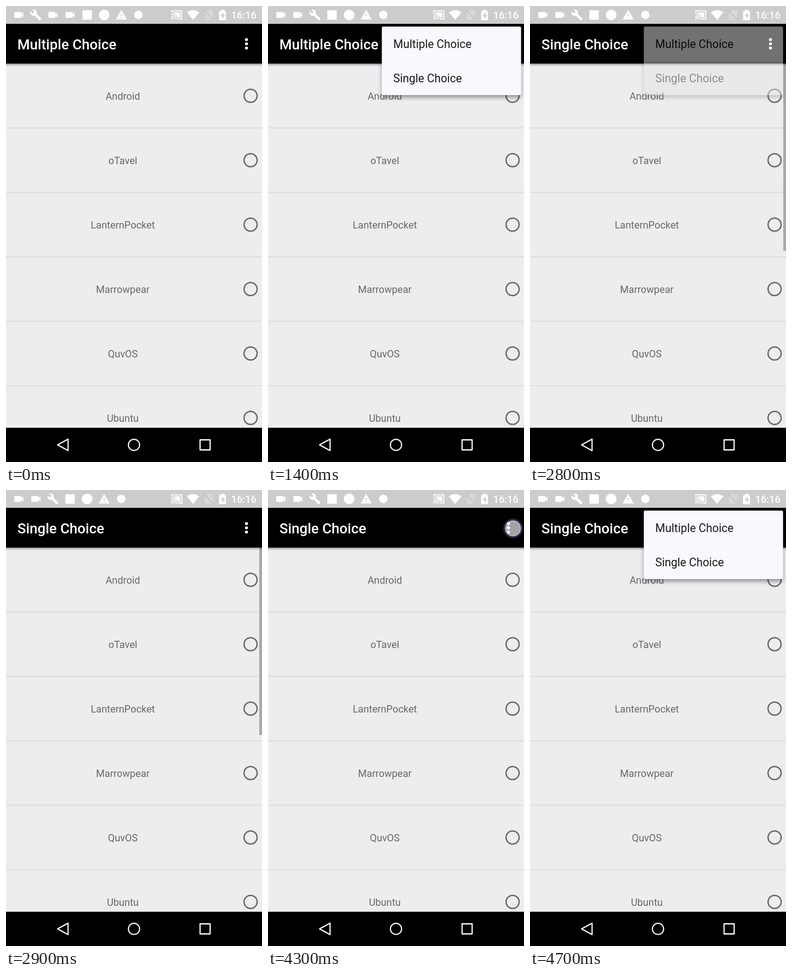
An HTML page that plays this animation: 561x998 px, repeating every 5.1 s.

```html
<!DOCTYPE html>
<html lang="en">
<head>
<meta charset="utf-8">
<title>Choice list</title>
<style>
  html, body { margin: 0; width: 100%; height: 100%; overflow: hidden; background: #eeecef; }
  svg { display: block; width: 100%; height: 100%; font-family: Roboto, sans-serif; }
  .title { font-size: 31.1px; font-weight: 500; fill: #fff; }
  .clock { font-size: 21.8px; font-weight: 500; fill: #fff; }
  .row { font-size: 21.8px; fill: #69676a; text-anchor: middle; }
  .item { font-size: 24.9px; fill: #1b1a1d; }
</style>
</head>
<body>
<svg viewBox="0 0 561 998">
  <defs>
    <linearGradient id="barShadow" x2="0" y2="1">
      <stop stop-color="#000" stop-opacity=".36"/>
      <stop offset="1" stop-color="#000" stop-opacity="0"/>
    </linearGradient>
    <filter id="menuShadow" x="-10%" y="-10%" width="120%" height="130%">
      <feDropShadow dx="0" dy="5" stdDeviation="5" flood-opacity=".4"/>
    </filter>
    <filter id="blur" x="-50%" y="-50%" width="200%" height="200%"><feGaussianBlur stdDeviation="2"/></filter>
    <path id="camera" d="M17 10.5V7q0-1-1-1H4q-1 0-1 1v10q0 1 1 1h12q1 0 1-1v-3.5l4 4v-11z"/>
    <path id="wrench" d="M22.7 19l-9.1-9.1c.9-2.3.4-5-1.5-6.9-2-2-5-2.4-7.4-1.3L9 6 6 9 1.6 4.7C.4 7.1.9 10.1 2.9 12.1c1.9 1.9 4.6 2.4 6.9 1.5l9.1 9.1q.7.6 1.4 0l2.3-2.3q.8-.7.1-1.4z"/>
    <path id="square" d="M2.6 2.7h18.8v18.8H2.6z"/>
    <circle id="disc" cx="12" cy="12" r="10.5"/>
    <path id="warning" d="M1 21h22L12 2zm12-3h-2v-2h2zm0-4h-2v-4h2z"/>
    <circle id="dot" cx="12" cy="12" r="8.5"/>
  </defs>

  <g id="list"></g>
  <rect id="scrollbar" x="555" y="126" width="6" height="410" fill="#a9a8aa"/>

  <rect y="126" width="561" height="6" fill="url(#barShadow)"/>
  <rect y="39" width="561" height="87"/>
  <text id="title" class="title" x="25" y="95"></text>
  <circle id="ripple" cx="537" cy="83" r="43" fill="#fff" fill-opacity=".18"/>
  <g fill="#fff">
    <circle cx="527" cy="73.5" r="3.3"/><circle cx="527" cy="82.8" r="3.3"/><circle cx="527" cy="92" r="3.3"/>
  </g>

  <rect width="561" height="39" fill="#cdcbce"/>
  <g id="notices" fill="#fff"></g>
  <g fill="#fff">
    <g transform="translate(361 6.3) scale(1.1)">
      <path d="M2 8V4h20v16h-8" fill="none" stroke="#fff" stroke-width="2"/>
      <path d="M19 7H5v1.6q6.3 2.1 8.4 8.4H19zM1 18v3h3q0-3-3-3z"/>
      <path d="M1 15q6 0 6 6M1 11q10 0 10 10" fill="none" stroke="#fff" stroke-width="2"/>
    </g>
    <path d="M410 30.5L396.300 14Q410 4 423.700 14Z"/>
    <path d="M442 9h11.500v21H436V15z" fill="#d9d7da"/>
    <path d="M435 10l19 20" stroke="#c2c0c3" stroke-width="2"/>
    <path d="M471.500 8h7v3h3.500v20h-15V11h4.500z"/>
    <path d="M476.500 14l-6 8h4v6l6-8h-4z" fill="#cdcbce"/>
  </g>
  <text class="clock" x="493.500" y="28">16:16</text>

  <rect y="923" width="561" height="75"/>
  <g fill="none" stroke="#efedf0" stroke-width="2.800" stroke-linejoin="round">
    <path d="M113 960.500L136 948v25z"/>
    <circle cx="280.500" cy="960.500" r="12.200"/>
    <rect x="425.300" y="949.500" width="22" height="22"/>
  </g>

  <g id="menu">
    <rect x="249.500" y="45" width="305" height="150" rx="3" fill="#faf8fc" filter="url(#menuShadow)"/>
    <rect id="pressed" x="249.500" y="120" width="305" height="75" fill-opacity=".08"/>
    <text class="item" x="274.500" y="92">Multiple Choice</text>
    <text class="item" x="274.500" y="167">Single Choice</text>
  </g>

  <g id="touch">
    <circle r="18" fill="none" stroke="#9fa4dc" stroke-width="3" stroke-opacity=".7" filter="url(#blur)"/>
    <circle r="16.500" fill="#fff" fill-opacity=".64" stroke="#b4b8df" stroke-width="1.500"/>
    <g id="touchDots" fill="#fff"></g>
  </g>
</svg>

<script>
const LOOP = 5100, STEP = 100;
const el = id => document.getElementById(id);
const within = (t, from, to) => t >= from && t < to;
const fade = (id, opacity) => el(id).setAttribute('opacity', opacity);

const labels = ['Android', 'oTavel', 'LanternPocket', 'Marrowpear', 'QuvOS', 'Ubuntu'];
el('list').innerHTML = '<rect width="561" height="923" fill="#eeecef"/>' + labels.map((label, i) => `
  <g transform="translate(0 ${126 + 141 * i})">
    <text class="row" x="256" y="79">${label}</text>
    <circle cx="536" cy="70.500" r="14.300" fill="none" stroke="#6b696c" stroke-width="3"/>
    <path d="M0 140.800h561" stroke="#d2d0d3" stroke-width="1.300"/>
  </g>`).join('');

// Redrawn above the touch mark, which lets the white dots show through.
el('touchDots').innerHTML = [73.5, 82.8, 92].map(y => `<circle cx="527" cy="${y}" r="3.3"/>`).join('');

const noticeRow = names => names.split(' ').map((name, i) =>
  `<use href="#${name}" transform="translate(${14.8 + 37.45 * i} 6.3) scale(1.1)"/>`).join('');
const noticesBefore = noticeRow('camera wrench camera camera square disc warning dot');
const noticesAfter = noticeRow('camera camera wrench square disc warning dot');

// Taps: where, and the mark's strength in each step after it starts.
const taps = [
  { start: 800, x: 537, y: 93, levels: [.75, .6, .22] },
  { start: 2600, x: 412, y: 160, levels: [1, .45] },
  { start: 4200, x: 537, y: 84, levels: [.75, 1, .55, .2] }
];

function drawTouch(t) {
  const tap = taps.find(p => within(t, p.start, p.start + STEP * p.levels.length));
  fade('touch', tap ? tap.levels[(t - tap.start) / STEP] : 0);
  if (!tap) return;
  el('touch').setAttribute('transform', `translate(${tap.x} ${tap.y})`);
  el('touchDots').setAttribute('transform', `translate(${-tap.x} ${-tap.y})`);
  fade('touchDots', tap.x > 500 ? 1 : 0);
}

function menuOpacity(t) {
  if (within(t, 1100, 2800) || t >= 4700) return 1;
  if (t === 2800) return .45;
  return t === 4600 ? .85 : 0;
}

let shown = -1;
function draw(now) {
  const t = Math.floor(now % LOOP / STEP) * STEP;
  if (t !== shown) {
    shown = t;
    el('notices').innerHTML = t < 300 ? noticesBefore : noticesAfter;
    el('title').textContent = t < 2800 ? 'Multiple Choice' : 'Single Choice';
    fade('menu', menuOpacity(t));
    fade('pressed', t === 2700 || t === 2800 ? 1 : 0);
    fade('ripple', within(t, 1100, 1400) || t === 4600 ? 1 : 0);
    fade('scrollbar', t < 2800 ? 0 : Math.max(0, Math.min(1, (4200 - t) / 300)));
    drawTouch(t);
  }
  requestAnimationFrame(tick);
}

const start = performance.now();
function tick() { draw(performance.now() - start); }
tick();
</script>
</body>
</html>
```
